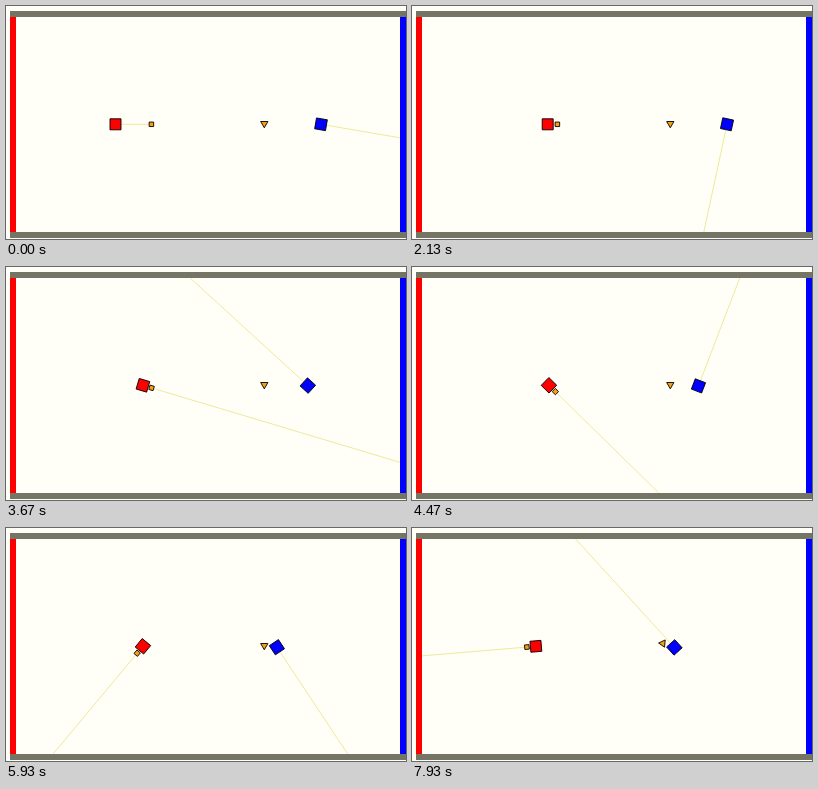
Recreate the animation shown at these times as an HTML page with a canvas. Size 400 px wide and 233 px high, loop 8000 ms.

```html
<!DOCTYPE html>
<html lang="en">
<head>
<meta charset="utf-8">
<title>Two robots</title>
<style>
html, body { margin: 0; width: 100%; height: 100%; overflow: hidden; background: #fffff8; }
canvas { display: block; }
</style>
</head>
<body>
<canvas id="stage" width="400" height="233"></canvas>
<script>
const ctx = document.getElementById('stage').getContext('2d');
const LOOP = 8000, STEP = 1000 / 15, RAD = Math.PI / 180;
const ARENA = { left: 10, top: 11, right: 394, bottom: 226 };
const RED = '#f00', BLUE = '#00f', ORANGE = '#f5a010', WALL = '#757566', RAY = '#ebeb9c';
const ROBOT = 11, MID_Y = 118.3;

// Seconds: box grabbed, blue kicks off, triangle struck, red brakes its turn, red heads home.
const GRAB = 2.4, KICK = 3.18, HIT = 5.93, BRAKE = 6.07, HOME = 6.95;

// Distance gained from a constant push between two times, coasting afterwards.
function push(t, from, to, accel) {
  const pushed = Math.max(0, Math.min(t, to) - from);
  const coast = Math.max(0, t - to);
  return accel * pushed * (pushed / 2 + coast);
}

function polar(p, r, turn) {
  return { x: p.x + r * Math.cos(turn * RAD), y: p.y + r * Math.sin(turn * RAD) };
}

function redPose(t) {
  const cruise = 15.5, spin = 20.8, brakeTime = 0.92;
  return {
    x: 109.5 + cruise * t + push(t, 0.87, 2.67, -cruise / 1.8) + push(t, HOME, 8, -27),
    y: MID_Y,
    turn: push(t, GRAB, BRAKE, spin)
      + push(t, BRAKE, BRAKE + brakeTime, -spin * (BRAKE - GRAB) / brakeTime)
  };
}

function bluePose(t) {
  const drift = 1 - Math.exp(-0.54 * Math.max(0, t - KICK));
  return {
    x: 315 - 57 * drift,
    y: MID_Y + 1.2 * drift,
    turn: 9.7 + 22 * t + push(t, 0, KICK, 20)
  };
}

function trianglePose(t) {
  const u = Math.max(0, t - HIT) / 2, ease = u * (3 - u) / 2;
  return { x: 258.3 - 7.5 * ease, y: 117.6 - 2.2 * ease, turn: 90 - 145 * ease };
}

function polygon(p, sides, radius, turn, fill) {
  ctx.beginPath();
  for (let i = 0; i < sides; i++) {
    const v = polar(p, radius, turn + i * 360 / sides);
    ctx.lineTo(v.x, v.y);
  }
  ctx.closePath();
  ctx.fillStyle = fill;
  ctx.fill();
  ctx.strokeStyle = '#000';
  ctx.lineWidth = 0.9;
  ctx.stroke();
}

function square(p, size, fill) {
  polygon(p, 4, size * Math.SQRT1_2, p.turn + 45, fill);
}

// Sight line up to the first wall or obstacle.
function ray(from, obstacles) {
  const dx = Math.cos(from.turn * RAD), dy = Math.sin(from.turn * RAD);
  const toX = ((dx > 0 ? ARENA.right : ARENA.left) - from.x) / dx;
  const toY = ((dy > 0 ? ARENA.bottom : ARENA.top) - from.y) / dy;
  let reach = Math.min(Math.abs(toX), Math.abs(toY));
  for (const [p, r] of obstacles) {
    const x = p.x - from.x, y = p.y - from.y;
    const along = x * dx + y * dy, off = x * dy - y * dx;
    if (along > 0 && Math.abs(off) < r) {
      reach = Math.min(reach, along - Math.sqrt(r * r - off * off));
    }
  }
  const end = polar(from, reach, from.turn);
  ctx.strokeStyle = RAY;
  ctx.lineWidth = 1;
  ctx.beginPath();
  ctx.moveTo(from.x, from.y);
  ctx.lineTo(end.x, end.y);
  ctx.stroke();
}

function bar(x, y, w, h, fill) {
  ctx.fillStyle = fill;
  ctx.fillRect(x, y, w, h);
}

function draw(t) {
  const red = redPose(t), blue = bluePose(t), tri = trianglePose(t);
  const held = t >= GRAB;
  const spot = held ? polar(red, 9, red.turn) : { x: 145.4, y: MID_Y };
  const box = { ...spot, turn: red.turn };

  bar(0, 0, 400, 233, '#fffff8');
  const reach = ROBOT * Math.SQRT1_2;
  ray(red, [[tri, 3], [blue, reach], ...(held ? [] : [[box, 2.5]])]);
  ray(blue, [[tri, 3], [box, 2.5], [red, reach]]);

  bar(4, 11, 6, 215, RED);
  bar(394, 11, 6, 215, BLUE);
  bar(4, 5, 396, 6, WALL);
  bar(4, 226, 396, 6, WALL);

  square(box, 4.5, ORANGE);
  polygon(tri, 3, 4.2, tri.turn, ORANGE);
  square(red, ROBOT, RED);
  square(blue, ROBOT, BLUE);
}

const start = performance.now();
function tick() {
  const ms = (performance.now() - start) % LOOP;
  // The picture advances 15 times a second; the margin absorbs rounded clock times.
  draw(Math.floor((ms + 3.4) / STEP) % 120 / 15);
  requestAnimationFrame(tick);
}
tick();
</script>
</body>
</html>
```
